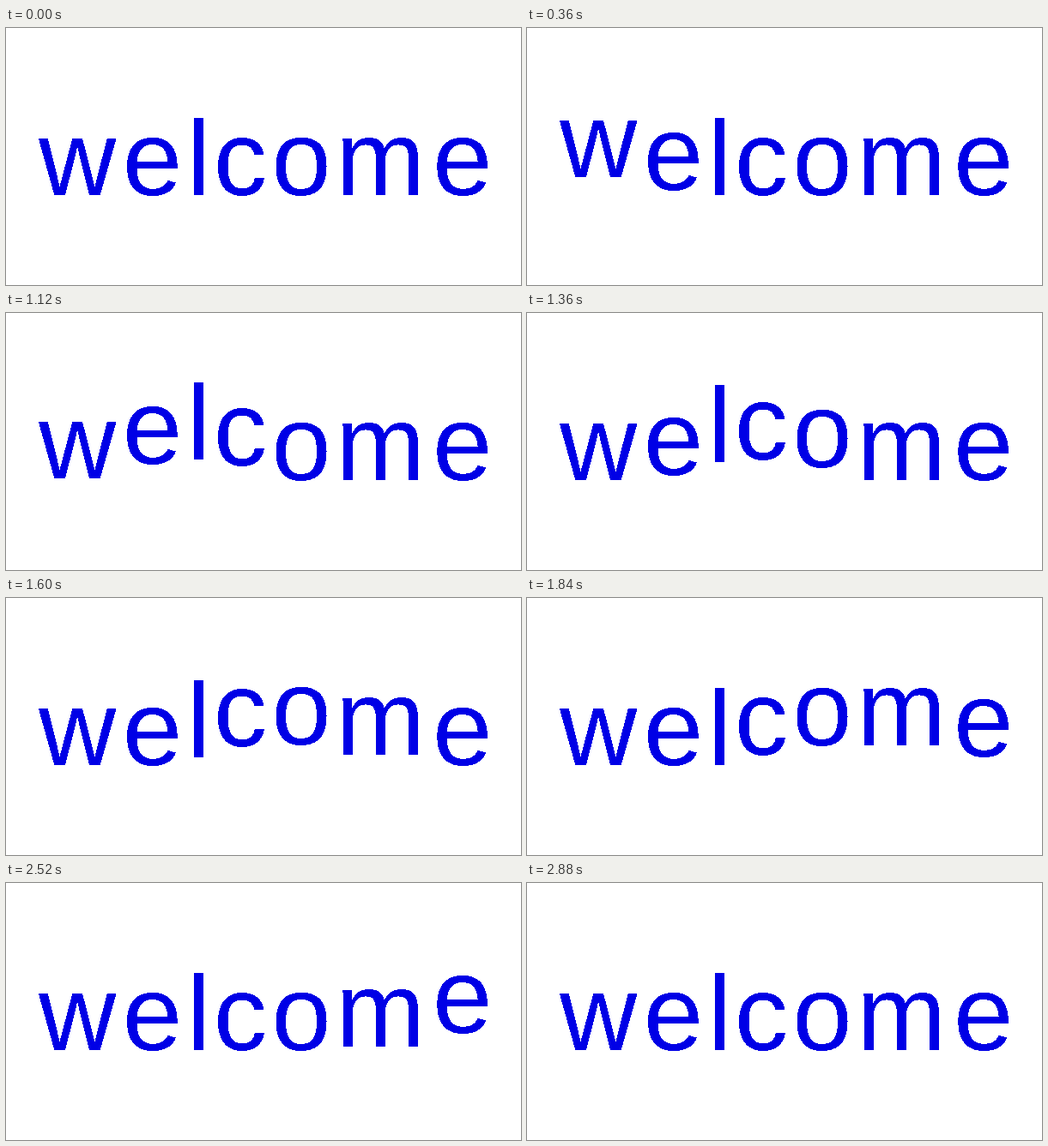
An HTML page for the animation above (4000 ms loop, 600 by 300 pixels).

```html
<!DOCTYPE html>
<html lang="en">
<head>
<meta charset="utf-8">
<title>welcome</title>
<style>
  html, body { margin: 0; width: 100%; height: 100%; overflow: hidden; background: #fff; }
  svg { display: block; width: 600px; height: 300px; }
  text {
    font: 125px "Liberation Sans", Arial, sans-serif;
    fill: #0000e6;
    text-anchor: middle;
  }
</style>
</head>
<body>
<svg viewBox="0 0 600 300">
  <filter id="hard" filterUnits="userSpaceOnUse" x="0" y="0" width="600" height="300" color-interpolation-filters="sRGB">
    <feComponentTransfer><feFuncA type="discrete" tableValues="0 1"/></feComponentTransfer>
  </filter>
  <g id="word" filter="url(#hard)"></g>
</svg>
<script>
  const LOOP = 4000, STEP = 40, BASE = 195;
  const DELAY = 2000 / 7, HOP = 4 * DELAY, HEIGHT = 24.5;

  const word = document.getElementById("word");
  const centres = [83.2, 170.5, 224.5, 273, 344, 436.1, 531.8];
  const letters = [..."welcome"].map((char, i) => {
    const el = document.createElementNS("http://www.w3.org/2000/svg", "text");
    el.textContent = char;
    el.setAttribute("x", centres[i]);
    word.append(el);
    return el;
  });

  // Parabolic hop, zero outside 0..1
  const arc = u => u > 0 && u < 1 ? 4 * u * (1 - u) : 0;

  function draw(time) {
    const t = Math.floor((time % LOOP) / STEP) * STEP;
    letters.forEach((el, i) => {
      const lift = HEIGHT * arc((t - i * DELAY) / HOP);
      el.setAttribute("y", BASE - Math.round(lift));
    });
  }

  const begin = performance.now();
  function tick() {
    draw(performance.now() - begin);
    requestAnimationFrame(tick);
  }
  draw(0);
  requestAnimationFrame(tick);
</script>
</body>
</html>
```
